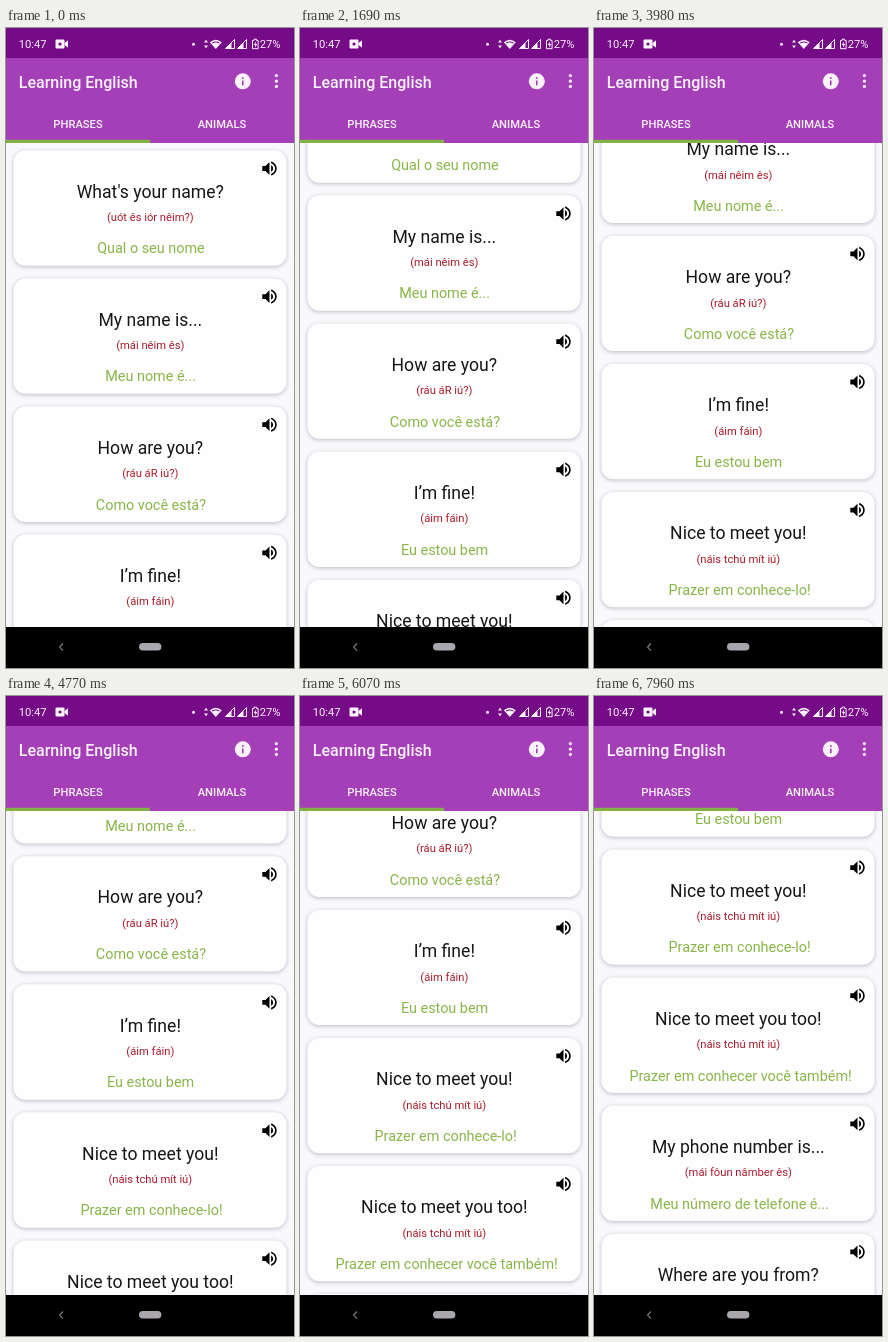
An HTML page for the animation above (8000 ms loop, 288 px wide and 640 px high).

```html
<!DOCTYPE html>
<html lang="en">
<head>
<meta charset="utf-8">
<title>Learning English</title>
<style>
  html, body { margin: 0; width: 100%; height: 100%; overflow: hidden; background: #000; }
  svg { display: block; }
  text { font-family: Roboto, "Open Sans", sans-serif; }
  .mid { text-anchor: middle; }
  .phrase { font-size: 17.6px; fill: #161616; }
  .sound { font-size: 11.2px; fill: #a81c2c; }
  .meaning { font-size: 14.4px; fill: #8ab54a; }
  .bar { fill: #fbf2fc; font-size: 11.2px; }
  .tab { font-weight: 500; }
  .title { font-weight: 500; font-size: 16px; }
  .card { fill: #fefefe; filter: drop-shadow(0 1.6px 2.2px rgba(60, 55, 90, .32)); }
</style>
</head>
<body>
<svg width="288" height="640" viewBox="0 0 288 640">
  <defs>
    <clipPath id="view"><rect y="115" width="288" height="484"/></clipPath>
    <path id="speaker" transform="scale(.8)" d="M3 9v6h4l5 5V4L7 9H3zm13.5 3c0-1.77-1.02-3.29-2.5-4.03v8.05c1.48-.73 2.5-2.25 2.5-4.02zM14 3.23v2.06c2.89.86 5 3.54 5 6.71s-2.11 5.85-5 6.71v2.06c4.01-.91 7-4.49 7-8.77s-2.99-7.86-7-8.77z"/>
  </defs>

  <rect y="115" width="288" height="484" fill="#f9f8fb"/>
  <g clip-path="url(#view)"><g id="list"></g></g>

  <rect width="288" height="30" fill="#750b87"/>
  <rect y="30" width="288" height="85" fill="#a43fb8"/>
  <rect y="111.8" width="144" height="3.2" fill="#82b244"/>

  <g class="bar">
    <text x="12.8" y="20">10:47</text>
    <rect x="49.5" y="11.5" width="9" height="9" rx="1"/>
    <path d="M58.5 15l3.5-2.8v7.6l-3.5-2.8z"/>
    <circle cx="54" cy="16" r="1.6" fill="#750b87"/>
    <circle cx="187.5" cy="16.3" r="1.5"/>
    <path d="M198 14.5l2-2.7 2 2.7zM198 17.5l2 2.7 2-2.7z"/>
    <path d="M203.8 14.2Q209.8 9.2 215.8 14.2L209.8 21z"/>
    <path d="M206 15Q209.8 12.6 213.6 15" fill="none" stroke="#750b87"/>
    <g id="signal">
      <path d="M219.5 20.5h9v-9z" fill="none" stroke="#fbf2fc"/>
      <path d="M219.5 20.5h6v-6z"/>
    </g>
    <use href="#signal" x="12"/>
    <path d="M246.5 12.5h1.5v-1.3h2.6v1.3h1.5v8.2h-5.6z" fill="none" stroke="#fbf2fc"/>
    <path d="M249.8 13.5l-2 3.6h1.4v2.7l2-3.7h-1.4z"/>
    <text x="253.7" y="20">27%</text>

    <text class="title" x="12.8" y="59.6">Learning English</text>
    <circle cx="236.8" cy="53.3" r="8"/>
    <path d="M236 52.5h1.6v4.8H236zM236 49.3h1.6v1.6H236z" fill="#a43fb8"/>
    <circle cx="270.4" cy="47.6" r="1.6"/>
    <circle cx="270.4" cy="53.2" r="1.6"/>
    <circle cx="270.4" cy="58.4" r="1.6"/>
    <text class="tab mid" x="72" y="100.4">PHRASES</text>
    <text class="tab mid" x="216" y="100.4">ANIMALS</text>
  </g>

  <rect y="599" width="288" height="41"/>
  <path d="M57 615.5l-3.4 3.6 3.4 3.6" fill="none" stroke="#7c7c80" stroke-width="1.2"/>
  <rect x="133" y="615" width="22.4" height="7.6" rx="3.8" fill="#aaa6ad"/>
</svg>
<script>
  const LOOP = 8000, STEP = 99.5, PITCH = 128.1;

  // phrase, pronunciation, translation, sideways nudge of the translation
  const cards = [
    ["What's your name?", "(uót ês iór nêim?)", "Qual o seu nome", 0.6],
    ["My name is...", "(mái nêim ês)", "Meu nome é...", 0.3],
    ["How are you?", "(ráu áR iú?)", "Como você está?", 0.6],
    ["I’m fine!", "(áim fáin)", "Eu estou bem", 0.3],
    ["Nice to meet you!", "(náis tchú mít iú)", "Prazer em conhece-lo!", 1.3],
    ["Nice to meet you too!", "(náis tchú mít iú)", "Prazer em conhecer você também!", 2.3],
    ["My phone number is...", "(mái fôun nâmber ês)", "Meu número de telefone é...", 1.3],
    ["Where are you from?", "(uér áR iú fróm?)", "De onde você é?", 0]
  ];

  const label = (kind, y, text, dx = 0) =>
    `<text class="mid ${kind}" x="${144.3 + dx}" y="${y}">${text}</text>`;

  const list = document.getElementById("list");
  list.innerHTML = cards.map(([phrase, sound, meaning, dx], i) => `
    <g transform="translate(0 ${i * PITCH})">
      <rect class="card" x="7.5" y="122.3" width="273" height="115.4" rx="12"/>
      <use href="#speaker" x="253.9" y="130.9"/>
      ${label("phrase", 169.6, phrase)}
      ${label("sound", 193.2, sound)}
      ${label("meaning", 225.4, meaning, dx)}
    </g>`).join("");

  // time in ms, scroll distance in px
  const stops = [[0, 0], [1690, 83], [3080, 124.5], [4770, 218], [6070, 293], [6760, 370.5], [7960, 481.3]];
  const slopes = stops.slice(1).map(([t, y], i) => (y - stops[i][1]) / (t - stops[i][0]));
  const tangents = stops.map((_, i) => {
    const a = slopes[i - 1] ?? slopes[0], b = slopes[i] ?? a;
    return 2 * a * b / (a + b);
  });

  // smooth curve through the stops that never scrolls back
  function scrollAt(t) {
    let i = 0;
    while (i < stops.length - 2 && t >= stops[i + 1][0]) i++;
    const [t0, y0] = stops[i], [t1, y1] = stops[i + 1];
    const d = t1 - t0, u = Math.min(1, Math.max(0, (t - t0) / d)), v = 1 - u;
    return y0 * (1 + 2 * u) * v * v + y1 * u * u * (3 - 2 * u)
      + d * u * v * (tangents[i] * v - tangents[i + 1] * u);
  }

  function draw() {
    const t = performance.now() % LOOP;
    const held = Math.floor((t + 8) / STEP) * STEP;
    list.setAttribute("transform", `translate(0 ${-scrollAt(held).toFixed(2)})`);
    requestAnimationFrame(draw);
  }
  draw();
</script>
</body>
</html>
```
